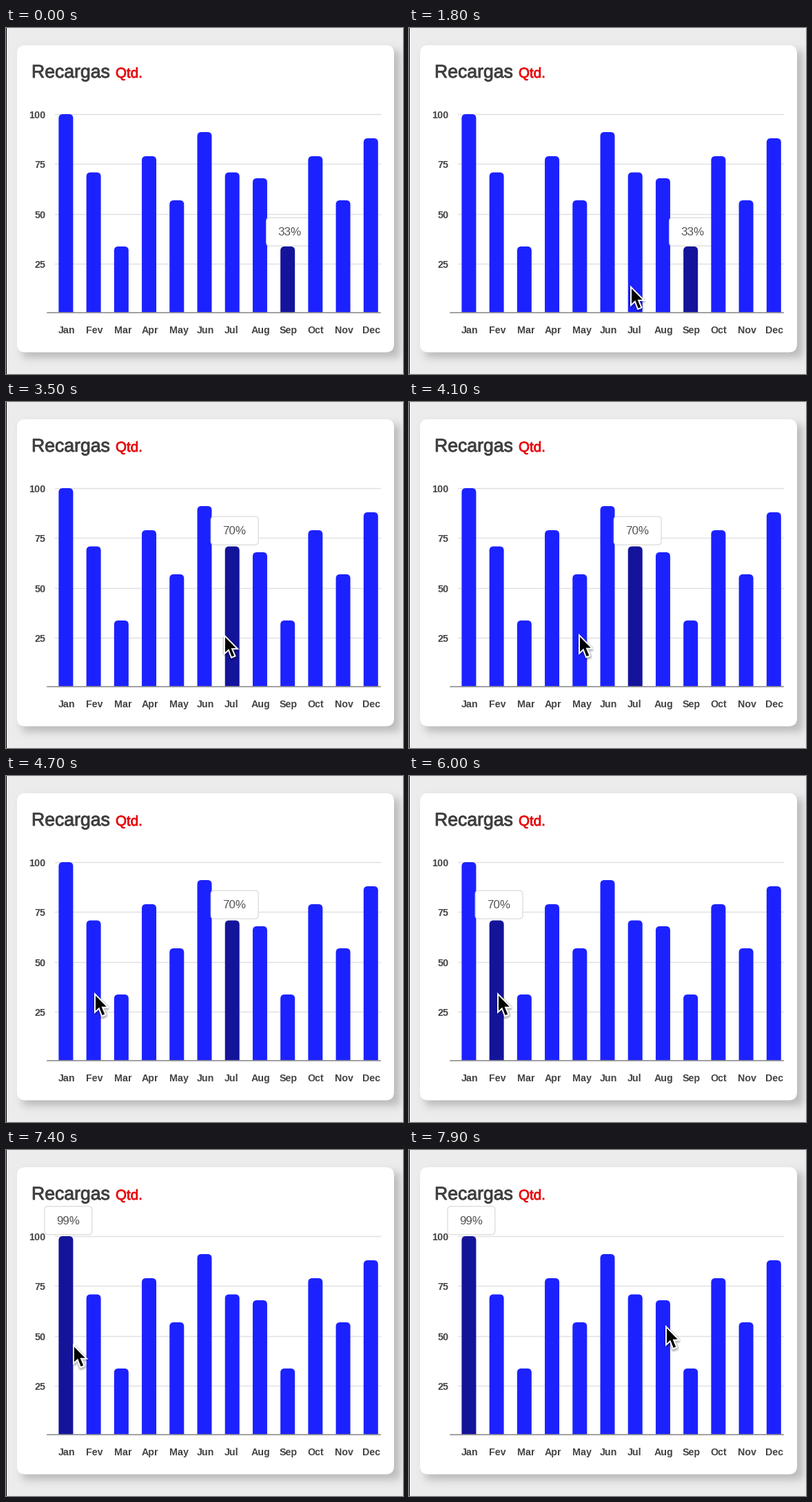
These frames come from a looping animation (576 px wide and 502 px high, 8 s). A matplotlib script:

```python
import numpy as np
import matplotlib.pyplot as plt
from matplotlib.animation import FuncAnimation
from matplotlib.patches import FancyBboxPatch, PathPatch, Polygon, Rectangle
from matplotlib.path import Path
from matplotlib.patheffects import withStroke
from matplotlib.transforms import Affine2D

W, H, DPI = 576, 502, 64  # a power of two keeps the pixel size exact
PT = 72 / DPI  # points per pixel
STEP, FRAMES = 100, 80

BLUE, NAVY = "#1c22ff", "#14149b"
MONTHS = "Jan Fev Mar Apr May Jun Jul Aug Sep Oct Nov Dec".split()
LABEL_X = [88.5, 128.5, 170, 208.5, 251, 289, 327.5, 370, 410, 449, 490.5, 530]
TOPS = [125, 209.5, 317, 186, 250, 151, 209.5, 218, 317, 186, 250, 160]
BAR_X, BAR_GAP, BAR_W, FLOOR = 76.4, 40.22, 21, 412.8

# bar index: (label, tooltip top)
TIPS = {8: ("33%", 275.2), 6: ("70%", 166.2), 1: ("70%", 166.2), 0: ("99%", 81.7)}
# start time in ms, active bar
HOVERS = [(0, 8), (2600, 6), (4900, 1), (7000, 0)]

# time in ms, x, y of the pointer tip
POINTER = np.array([
    (1300, 337, 443), (1500, 330, 407), (1800, 321, 373.5), (2300, 318, 342.5),
    (3000, 316, 337), (3500, 316, 336.5), (3700, 322, 337), (3900, 305, 337),
    (4100, 246, 336), (4300, 176, 329), (4500, 138, 318), (4700, 128, 314),
    (6400, 128, 314), (6500, 122, 307), (6600, 108, 292), (6700, 96, 280),
    (6800, 91.5, 276), (7300, 91.5, 276), (7400, 97, 281), (7500, 125, 289),
    (7600, 185, 291), (7700, 265, 282), (7800, 335, 264), (7900, 372, 254),
])

fig = plt.figure(figsize=(W / DPI, H / DPI), dpi=DPI, facecolor="#ececec")
ax = fig.add_axes([0, 0, 1, 1])
ax.set_xlim(0, W)
ax.set_ylim(H, 0)
ax.axis("off")


def text(x, y, s, px, color, semibold=0, **kw):
    effects = [withStroke(linewidth=semibold * PT, foreground=color)] if semibold else None
    return ax.text(x, y, s, fontsize=px * PT, color=color, family="Liberation Sans",
                   path_effects=effects, **kw)


def round_box(x, y, w, h, r, **kw):
    return ax.add_patch(FancyBboxPatch(
        (x, y), w, h, boxstyle=f"round,pad=0,rounding_size={r}", **kw))


def draw_bar(i):
    l, t, r = BAR_X + BAR_GAP * i, TOPS[i], 6
    right = l + BAR_W
    points = [(l, FLOOR), (l, t + r), (l, t), (l + r, t),
              (right - r, t), (right, t), (right, t + r), (right, FLOOR)]
    codes = [Path.MOVETO, Path.LINETO, Path.CURVE3, Path.CURVE3,
             Path.LINETO, Path.CURVE3, Path.CURVE3, Path.LINETO]
    return ax.add_patch(PathPatch(Path(points, codes), fc=BLUE, lw=0, zorder=10 + i))


def draw_tip(i):
    label, top = TIPS[i]
    left, z = BAR_X + BAR_GAP * i - 20.4, 10.5 + i
    box = round_box(left, top, 68.8, 41, 5, fc="white", ec="#dcdcdc", lw=1.3 * PT, zorder=z)
    caption = text(left + 34, top + 26, label, 17, "#555555", ha="center", zorder=z)
    return box, caption


def draw_card():
    def span(v, lo, hi, blur):
        return 1 / (1 + np.exp((lo - v) / blur)) - 1 / (1 + np.exp((hi - v) / blur))

    x, y = np.arange(W) + 0.5, np.arange(H) + 0.5
    shade = np.zeros((H, W, 4))
    shade[..., 3] = 0.22 * np.outer(span(y, 33, 478, 3.6), span(x, 24, 571, 3.6))
    ax.imshow(shade, extent=(0, W, H, 0), aspect="auto", zorder=0)
    round_box(16, 25, 547, 445.5, 12, fc="white", lw=0, zorder=1)
    ax.add_patch(Rectangle((0, 0), 1, H, fc="black", lw=0, zorder=1))


def draw_pointer():
    outline = 1.95 * np.array([(1, 2.4), (1, 13.6), (3.7, 11.1), (5.95, 16.95),
                               (7.8, 16.2), (5.4, 10.6), (9.1, 10.6)])
    parts = []
    for width in (9, 7.5, 6, 4.5):
        parts.append(Polygon(outline + (0.5, 1.8), fc="none", ec=(0, 0, 0, 0.07),
                             lw=width * PT, joinstyle="round", zorder=40))
    parts.append(Polygon(outline, fc="black", ec="white", lw=3.9 * PT,
                         joinstyle="miter", zorder=41))
    parts.append(Polygon(outline, fc="black", lw=0, zorder=42))
    for part in parts:
        ax.add_patch(part)
    return parts


draw_card()
text(37, 72, "Recargas", 26.6, "#404040", 0.9)
text(159, 72, "Qtd.", 20.6, "#e8080c", 0.8)

for value, y in zip((100, 75, 50, 25), (125, 197.3, 269.6, 342)):
    ax.plot([71, 543], [y, y], color="#e0e0e0", lw=1.4 * PT, zorder=5)
    text(57.5, y + 6, str(value), 14.4, "#444444", weight="bold", ha="right")
ax.plot([60, 543], [413, 413], color="#8c8c8c", lw=1.6 * PT, zorder=30)
for month, x in zip(MONTHS, LABEL_X):
    text(x, 443, month, 14.2, "#444444", weight="bold", ha="center")

bars = [draw_bar(i) for i in range(12)]
tips = {i: draw_tip(i) for i in TIPS}
pointer = draw_pointer()


def update(frame):
    now = frame * STEP
    active = [bar for start, bar in HOVERS if start <= now][-1]
    for i, bar in enumerate(bars):
        bar.set_facecolor(NAVY if i == active else BLUE)
    for i, parts in tips.items():
        for part in parts:
            part.set_visible(i == active)
    times, xs, ys = POINTER.T
    place = Affine2D().translate(np.interp(now, times, xs), np.interp(now, times, ys))
    for part in pointer:
        part.set_visible(now >= times[0])
        part.set_transform(place + ax.transData)
    return []


anim = FuncAnimation(fig, update, frames=FRAMES, interval=STEP, repeat=True, repeat_delay=0)
plt.show()
```
